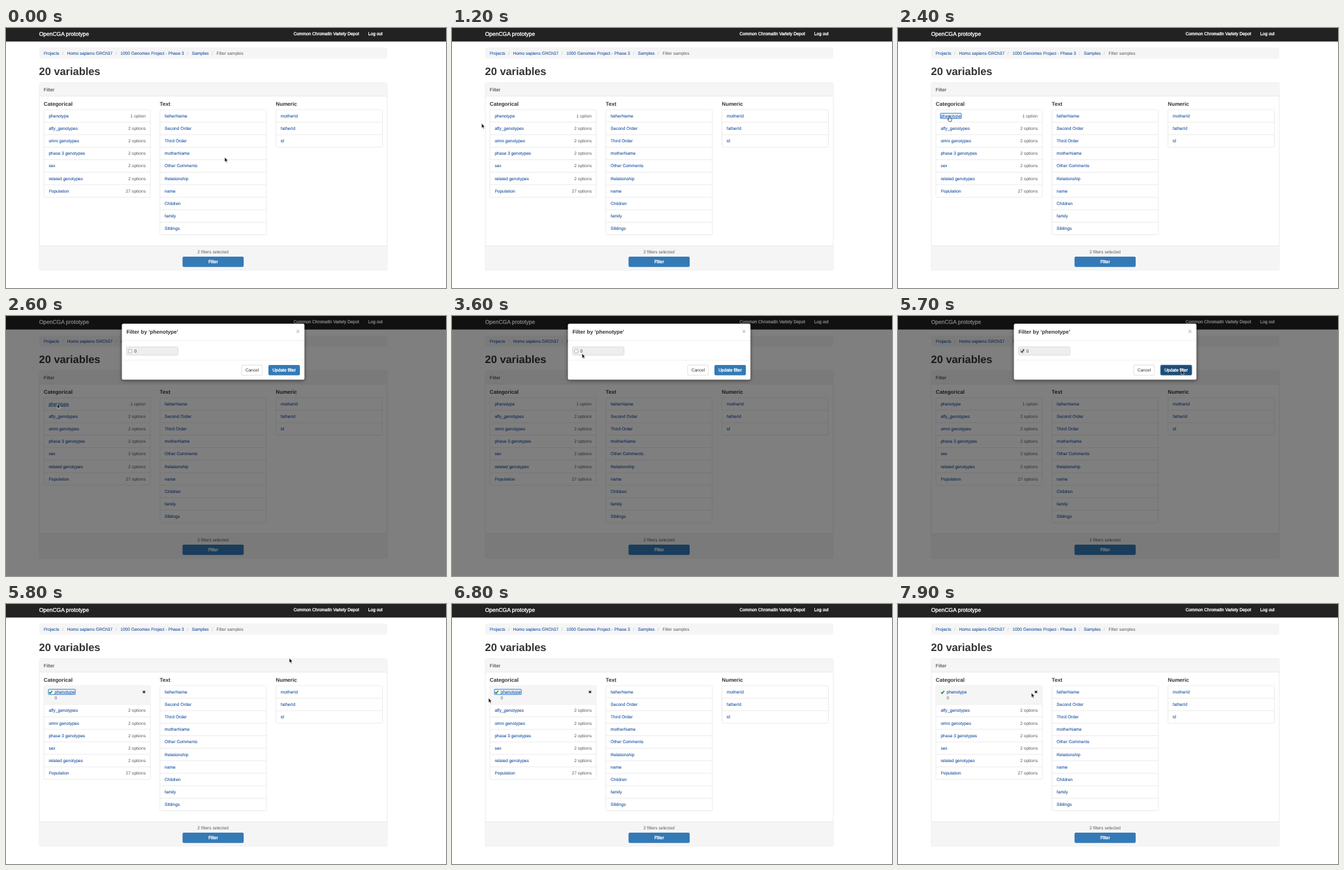
An HTML page for the animation above (8000 ms loop, 674 px wide and 398 px high).

```html
<!DOCTYPE html>
<html lang="en">
<head>
<meta charset="utf-8">
<title>Sample filter</title>
<style>
  html, body { margin: 0; width: 100%; height: 100%; overflow: hidden; background: #fff; }
  svg { display: block; width: 674px; height: 398px; }
  text { font: 6.6px "Liberation Sans", Arial, sans-serif; fill: #333; text-rendering: geometricPrecision; }
  .link { fill: #2559a5; stroke: #2559a5; stroke-width: .1px; }
  .muted { fill: #595959; }
  .slash { fill: #bbb; }
  .light { fill: #fff; stroke: #fff; stroke-width: .32px; }
  .brand { font-size: 8.5px; }
  .title { font-size: 16.4px; font-weight: bold; }
  .head { font-size: 8.15px; font-weight: bold; }
  .panel { font-size: 7.4px; }
  .close { font-size: 10px; font-weight: bold; fill: #bbb; }
  .mid { text-anchor: middle; }
  .end { text-anchor: end; }
  .hover { text-decoration: underline; }
  .dialog { filter: drop-shadow(0 1.5px 2.5px rgba(0, 0, 0, .6)); }
</style>
</head>
<body>
<svg id="stage" viewBox="0 0 674 398"></svg>
<script>
const LOOP = 8000, STEP = 100;
const ROW = 19.15, TOP = 125, WIDTH = 163, BASE = 11.8;
const BLUE = '#337ab7', GREY = '#f5f5f5', EDGE = '#ddd';
const stage = document.getElementById('stage');

function add(parent, tag, attrs = {}, content) {
  const el = document.createElementNS('http://www.w3.org/2000/svg', tag);
  for (const key in attrs) el.setAttribute(key, attrs[key]);
  if (content) el.textContent = content;
  return parent.appendChild(el);
}
const group = parent => add(parent, 'g');
const text = (parent, x, y, content, cls = '') => add(parent, 'text', { x, y, class: cls }, content);
const rect = (parent, x, y, width, height, fill, stroke = 'none', rx = 0) =>
  add(parent, 'rect', { x, y, width, height, fill, stroke, rx, 'stroke-width': .6 });
const line = (parent, x, y, width, stroke = EDGE) =>
  add(parent, 'path', { d: `M${x} ${y}h${width}`, stroke, 'stroke-width': .6 });
const path = (parent, d, attrs) => add(parent, 'path', { d, fill: 'none', ...attrs });
const show = (el, on) => { el.style.display = on ? '' : 'none'; };

function ring(parent, x, y, width, height) {
  const attrs = { x, y, width, height, rx: 1, fill: 'none' };
  const g = group(parent);
  add(g, 'rect', { ...attrs, stroke: '#a9cdf2', 'stroke-width': 1.6 });
  add(g, 'rect', { ...attrs, stroke: '#4a8fd6', 'stroke-width': .8 });
  return g;
}

function button(parent, x, y, width, label, primary) {
  const face = rect(parent, x, y, width, 15.8, primary ? BLUE : '#fff', primary ? 'none' : '#ccc', 2);
  text(parent, x + width / 2, y + 10.2, label, primary ? 'light mid' : 'mid');
  return face;
}

function listBox(parent, x, count, extra = 0) {
  rect(parent, x, TOP, WIDTH, count * ROW + extra, '#fff', EDGE, 2);
  for (let i = 1; i < count; i++) line(parent, x, TOP + i * ROW + extra, WIDTH);
}

function column(x, title, names) {
  text(stage, x, 118.6, title, 'head');
  if (!names) return;
  listBox(stage, x + .2, names.length);
  names.forEach((name, i) => text(stage, x + 7.5, TOP + BASE + i * ROW, name, 'link'));
}

// Page
rect(stage, 0, 0, 674, 398, '#fff');
rect(stage, 0, 0, 674, 20.7, '#222');
text(stage, 50.7, 11.7, 'OpenCGA prototype', 'light brand');
text(stage, 440.5, 11.2, 'Common Chromatin Variety Depot', 'light');
text(stage, 554.8, 11.2, 'Log out', 'light');

rect(stage, 51, 30, 533, 16.7, GREY, 'none', 2);
const crumbs = text(stage, 57.7, 40.7, '');
['Projects', 'Homo sapiens GRCh37', '1000 Genomes Project - Phase 3', 'Samples', 'Filter samples']
  .forEach((name, i, all) => {
    if (i) add(crumbs, 'tspan', { dx: 4.6, class: 'slash' }, '/');
    add(crumbs, 'tspan', { dx: i ? 5.6 : 0, class: i < all.length - 1 ? 'link' : 'muted' }, name);
  });
text(stage, 50.6, 71.6, '20 variables', 'title');

rect(stage, 51, 83.8, 533, 287, '#fff', EDGE, 2);
rect(stage, 51.3, 84.1, 532.4, 20, GREY);
line(stage, 51, 104.2, 533);
rect(stage, 51.3, 333.3, 532.4, 37.2, GREY);
line(stage, 51, 333.3, 533);
text(stage, 57.8, 96.7, 'Filter', 'panel');
text(stage, 317.2, 345.2, '2 filters selected', 'muted mid');
button(stage, 270.4, 350, 93.7, 'Filter', true);

column(57.8, 'Categorical');
column(235.6, 'Text', ['fatherName', 'Second Order', 'Third Order', 'motherName', 'Other Comments',
  'Relationship', 'name', 'Children', 'family', 'Siblings']);
column(413.3, 'Numeric', ['motherId', 'fatherId', 'id']);

// Categorical column, before and after choosing a value
function categoryList(chosen) {
  const g = group(stage), extra = chosen ? 9.4 : 0, y = TOP + BASE;
  const x = chosen ? 74.6 : 65.4;
  listBox(g, 58, 7, extra);
  ['affy_genotypes', 'omni genotypes', 'phase 3 genotypes', 'sex', 'related genotypes', 'Population']
    .forEach((name, i) => {
      const rowY = y + (i + 1) * ROW + extra;
      text(g, 65.4, rowY, name, 'link');
      text(g, 214, rowY, (name === 'Population' ? 27 : 2) + ' options', 'muted end');
    });
  if (chosen) {
    rect(g, 58.3, TOP + .3, WIDTH - .6, 28, GREY);
    path(g, 'M66 135.1l1.7 1.7 3.1-3.9', { stroke: '#1d8a2b', 'stroke-width': 1.5 });
    path(g, 'M209.7 132.9l3.4 3.4m0-3.4l-3.4 3.4', { stroke: '#222', 'stroke-width': 1.4 });
    text(g, x, 146.2, '0', 'muted');
  } else {
    text(g, 214, y, '1 option', 'muted end');
  }
  const link = text(g, x, y, 'phenotype', 'link');
  const focus = ring(g, 65, 130.6, x - 33.4, 7.9);
  return { g, link, focus };
}
const plain = categoryList(false), chosen = categoryList(true);

// Dialog
const modal = group(stage);
rect(modal, 0, 0, 674, 398, 'rgba(0,0,0,.5)');
rect(modal, 177.5, 11.8, 279.7, 85.8, '#fff', 'none', 2.5).classList.add('dialog');
line(modal, 177.5, 37.6, 279.7, '#e5e5e5');
line(modal, 177.5, 67.6, 279.7, '#e5e5e5');
text(modal, 184.4, 27.4, 'Filter by ‘phenotype’', 'head');
text(modal, 447.2, 27, '×', 'close mid');
rect(modal, 184.5, 47.2, 79, 12.8, '#eee', '#ccc', 2);
const box = rect(modal, 187.6, 51.2, 5.2, 5.2, '#fff', '#888', 1);
const boxFocus = ring(modal, 187.4, 51, 5.6, 5.6);
const tick = path(modal, 'M188.5 53.6l1.5 1.8 3.1-4.6', { stroke: '#12306e', 'stroke-width': 1.4 });
text(modal, 196.4, 56.2, '0');
button(modal, 361, 75, 31.8, 'Cancel');
const update = button(modal, 402, 74.9, 48.2, 'Update filter', true);

// Pointer
const pointer = group(stage);
const arrow = path(pointer, 'M0 0V7L1.6 5.6 2.7 8.1 3.9 7.5 2.8 5.1H5Z',
  { fill: '#111', stroke: '#fff', 'stroke-width': .5 });
const hand = path(pointer, 'M-.7 .5Q0-.4.7.5V3.2L3.6 4Q4.2 4.3 4 5.3L3.2 8.4H-.4L-2.4 5.2Q-2.3 4.2-1.4 4.8L-.7 5.4Z',
  { fill: '#fff', stroke: '#222', 'stroke-width': .7 });

// Each stroke: start, end, then Bézier points; it begins where the last one stopped.
const home = [335, 198];
const strokes = [
  [200, 1100, [120, 80], [-80, 95], [41, 148]],
  [1100, 1500, [55, 141], [80, 140]],
  [1700, 2000, [78.5, 134.7]],
  [2900, 3300, [140, 60], [198, 57]],
  [3500, 4300, [214, 64], [191.3, 54]],
  [4600, 5500, [220, 310], [330, 310], [434, 83]],
  [6000, 6800, [300, 120], [-72, 190], [56, 144]],
  [6900, 7300, [48, 150], [77, 136.5]],
  [7400, 7900, [140, 140], [204.3, 136]]
];
const ease = k => (1 - Math.cos(Math.PI * k)) / 2;
const mix = (a, b, k) => a.map((v, i) => v + (b[i] - v) * k);
const bezier = (pts, k) =>
  pts.length === 1 ? pts[0] : bezier(pts.slice(1).map((p, i) => mix(pts[i], p, k)), k);

function position(t) {
  let at = home;
  for (const [from, to, ...pts] of strokes) {
    if (t <= from) break;
    at = bezier([at, ...pts], ease(Math.min(1, (t - from) / (to - from))));
  }
  return at;
}

function draw(t) {
  const within = (from, to) => t >= from && t < to;
  const done = t >= 5800;
  show(plain.g, !done);
  show(chosen.g, done);
  show(modal, within(2600, 5800));

  plain.link.classList.toggle('hover', within(1800, 3000));
  show(plain.focus, within(2400, 2600));
  chosen.link.classList.toggle('hover', within(5800, 7000) || within(7300, 7500));
  show(chosen.focus, within(5800, 7000));

  box.setAttribute('fill', within(4300, 4500) ? '#ddd' : '#fff');
  show(tick, t >= 4500);
  show(boxFocus, within(4500, 5600));
  update.setAttribute('fill', t < 5500 ? BLUE : t < 5600 ? '#286090' : '#204d74');
  update.setAttribute('stroke', t < 5600 ? 'none' : '#5b9bd5');

  const pointing = within(1800, 2600) || within(7300, 7500);
  show(hand, pointing);
  show(arrow, !pointing);
  pointer.setAttribute('transform', `translate(${position(t)})`);
}

// The screen advances ten times a second.
const start = performance.now();
function loop(now) {
  const t = Math.max(0, now - start) % LOOP;
  draw(Math.floor(t / STEP) * STEP);
  requestAnimationFrame(loop);
}
loop(start);
</script>
</body>
</html>
```
